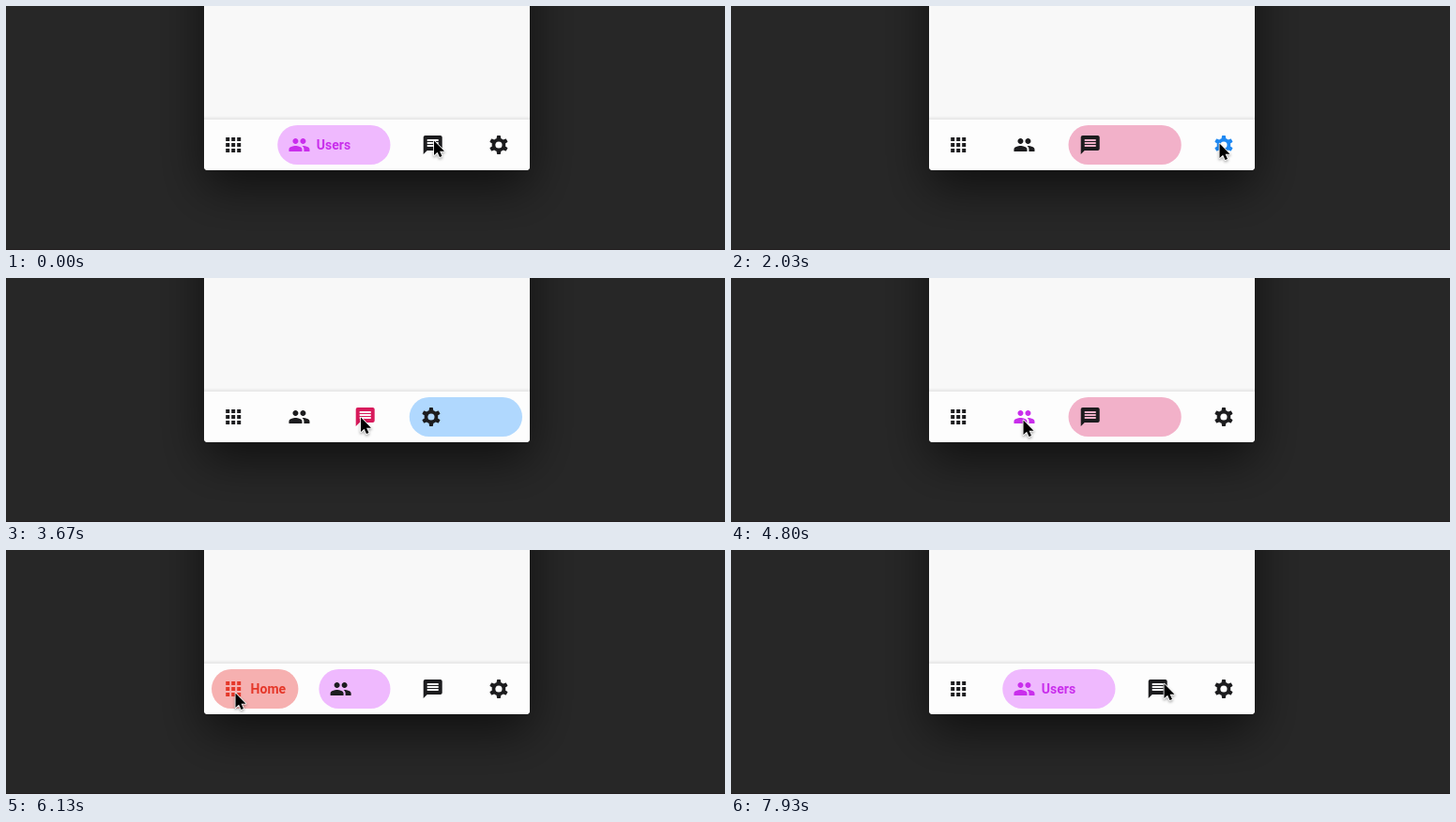
These frames come from a looping animation (766 px wide and 260 px high, 8 s). An HTML page with a canvas:

```html
<!DOCTYPE html>
<html lang="en">
<head>
<meta charset="utf-8">
<title>Bottom navigation</title>
<style>
  html, body { margin: 0; width: 100%; height: 100%; overflow: hidden; background: #272727; }
  canvas { display: block; width: 766px; height: 260px; }
</style>
</head>
<body>
<canvas id="stage"></canvas>
<script>
const W = 766, H = 260, LOOP = 8000;
const canvas = document.getElementById('stage');
const ctx = canvas.getContext('2d');
const dpr = window.devicePixelRatio || 1;
canvas.width = W * dpr;
canvas.height = H * dpr;

const INK = '#1c1c1e';
const BAR = { left: 219, top: 127, height: 42, gap: 22, closed: 48.25, open: 120.25 };

const apps = new Path2D();
for (const x of [4, 10, 16]) for (const y of [4, 10, 16]) apps.rect(x, y, 4, 4);

const group = new Path2D('M16 11c1.66 0 2.99-1.34 2.99-3S17.66 5 16 5c-1.66 0-3 1.34-3 3s1.34 3 3 3z' +
  'm-8 0c1.66 0 2.99-1.34 2.99-3S9.66 5 8 5C6.34 5 5 6.34 5 8s1.34 3 3 3z' +
  'm0 2c-2.33 0-7 1.17-7 3.5V19h14v-2.5c0-2.33-4.67-3.5-7-3.5z' +
  'm8 0c-.29 0-.62.02-.97.05 1.16.84 1.97 1.97 1.97 3.45V19h6v-2.5c0-2.33-4.67-3.5-7-3.5z');

const message = new Path2D('M20 2H4c-1.1 0-1.99.9-1.99 2L2 22l4-4h14c1.1 0 2-.9 2-2V4c0-1.1-.9-2-2-2z' +
  'm-2 12H6v-2h12v2zm0-3H6V9h12v2zm0-3H6V6h12v2z');

// Six-toothed gear with a round hole.
function gearPath() {
  const path = new Path2D();
  const tooth = new Path2D('M9.66 5.07l.4-2.66q.07-.41.48-.41h2.92q.41 0 .48.41l.4 2.66z');
  for (let i = 0; i < 6; i++) {
    const m = new DOMMatrix().translate(12, 12).rotate(i * 60).translate(-12, -12);
    path.addPath(tooth, m);
  }
  path.arc(12, 12, 7.35, 0, Math.PI * 2);
  path.closePath();
  path.moveTo(15.6, 12);
  path.arc(12, 12, 3.6, 0, Math.PI * 2, true);
  return path;
}

const items = [
  { label: 'Home', icon: apps, color: '#e53729', pill: '#f6b0b0' },
  { label: 'Users', icon: group, color: '#c92eec', pill: '#efb9fe' },
  { label: 'Messages', icon: message, color: '#d81b5c', pill: '#f2b1c9' },
  { label: 'Settings', icon: gearPath(), color: '#1e88f2', pill: '#b0d8fe' }
];

// [time, item selected]
const clicks = [[530, 2], [2000, 3], [3670, 2], [4800, 1], [5815, 0], [6880, 1]];
const DELAY = 30, DURATION = 500;

// Pointer tip: [time, x, y]
const pointer = [
  [0, 456, 143], [700, 456, 143], [1170, 502.5, 144.5], [1330, 513, 145], [1700, 520.5, 146],
  [2520, 520.5, 146], [2800, 523, 154], [3230, 378, 148],
  [3950, 378, 148], [4400, 311.5, 151],
  [5130, 311.5, 151], [5600, 244.5, 152],
  [6400, 244.5, 152], [6800, 384, 150],
  [7330, 384, 150], [7930, 461.5, 142]
];

const clamp = v => Math.max(0, Math.min(1, v));
const mix = (a, b, k) => a + (b - a) * k;

// y of cubic-bezier(.42, 0, 1, 1) at x
function easeIn(x) {
  let lo = 0, hi = 1, s = 0.5;
  for (let i = 0; i < 24; i++) {
    s = (lo + hi) / 2;
    const bx = 1.26 * (1 - s) * (1 - s) * s + 3 * (1 - s) * s * s + s * s * s;
    if (bx < x) lo = s; else hi = s;
  }
  return 3 * s * s - 2 * s * s * s;
}
const easeInOut = t => t < 0.5 ? easeIn(2 * t) / 2 : 1 - easeIn(2 - 2 * t) / 2;

function selection(time) {
  let from = 1, to = 1, start = -1e4;
  for (const [at, index] of clicks) {
    if (time < at) break;
    from = to;
    to = index;
    start = at;
  }
  const k = easeInOut(clamp((time - start - DELAY) / DURATION));
  return { to, share: i => (i === to ? (from === to ? 1 : k) : i === from ? 1 - k : 0) };
}

function pointerAt(time) {
  let i = 0;
  while (i < pointer.length - 2 && pointer[i + 1][0] <= time) i++;
  const [t0, x0, y0] = pointer[i], [t1, x1, y1] = pointer[i + 1];
  const t = clamp((time - t0) / (t1 - t0));
  const k = t * t * (3 - 2 * t);
  return [mix(x0, x1, k), mix(y0, y1, k)];
}

function box(x, y, w, h, r, fill) {
  ctx.beginPath();
  ctx.roundRect(x, y, w, h, r);
  ctx.fillStyle = fill;
  ctx.fill();
}

function drawCard() {
  ctx.fillStyle = '#272727';
  ctx.fillRect(0, 0, W, H);
  ctx.fillStyle = '#231f20';
  ctx.fillRect(0, 259, W, 1);

  ctx.save();
  ctx.shadowColor = 'rgba(0,0,0,.6)';
  ctx.shadowBlur = 50 * dpr;
  ctx.shadowOffsetY = 18 * dpr;
  box(211, -300, 347, 475, 4, '#f8f8f8');
  ctx.restore();

  const shade = ctx.createLinearGradient(0, 117, 0, 121);
  shade.addColorStop(0, 'rgba(0,0,0,0)');
  shade.addColorStop(1, 'rgba(0,0,0,.08)');
  ctx.fillStyle = shade;
  ctx.fillRect(211, 117, 347, 4);
  box(211, 121, 347, 54, [0, 0, 4, 4], '#fdfdfd');
}

function drawItem(item, x, width, share, active) {
  const { top, height } = BAR;
  ctx.globalAlpha = clamp(share / 0.3);
  box(x, top, width, height, height / 2, item.pill);
  ctx.globalAlpha = 1;

  ctx.save();
  ctx.translate(x + 11.2, top + 9);
  ctx.fillStyle = active ? item.color : INK;
  ctx.fill(item.icon);
  ctx.restore();

  if (!active) return;
  ctx.save();
  ctx.beginPath();
  ctx.rect(x + 40, top, Math.max(0, width - 52), height);
  ctx.clip();
  ctx.fillStyle = item.color;
  ctx.font = '700 14px Roboto, sans-serif';
  ctx.fillText(item.label, x + 41.6, 153);
  ctx.restore();
}

const arrow = new Path2D('M0 0V15.6L3.6 12.2 6 17.6 8.5 16.5 6.1 11.3H11Z');

function drawPointer([x, y]) {
  ctx.save();
  ctx.translate(x, y + 0.5);
  ctx.lineJoin = 'round';
  ctx.lineWidth = 1.6;
  ctx.strokeStyle = '#fff';
  ctx.shadowColor = 'rgba(0,0,0,.4)';
  ctx.shadowBlur = 3 * dpr;
  ctx.shadowOffsetY = 1.5 * dpr;
  ctx.stroke(arrow);
  ctx.shadowColor = 'transparent';
  ctx.fillStyle = '#000';
  ctx.fill(arrow);
  ctx.restore();
}

function draw(time) {
  ctx.setTransform(dpr, 0, 0, dpr, 0, 0);
  drawCard();
  const { to, share } = selection(time);
  let x = BAR.left;
  items.forEach((item, i) => {
    const width = mix(BAR.closed, BAR.open, share(i));
    drawItem(item, x, width, share(i), i === to);
    x += width + BAR.gap;
  });
  drawPointer(pointerAt(time));
}

const begin = performance.now();
function tick() {
  draw((performance.now() - begin) % LOOP);
  requestAnimationFrame(tick);
}
tick();
</script>
</body>
</html>
```
